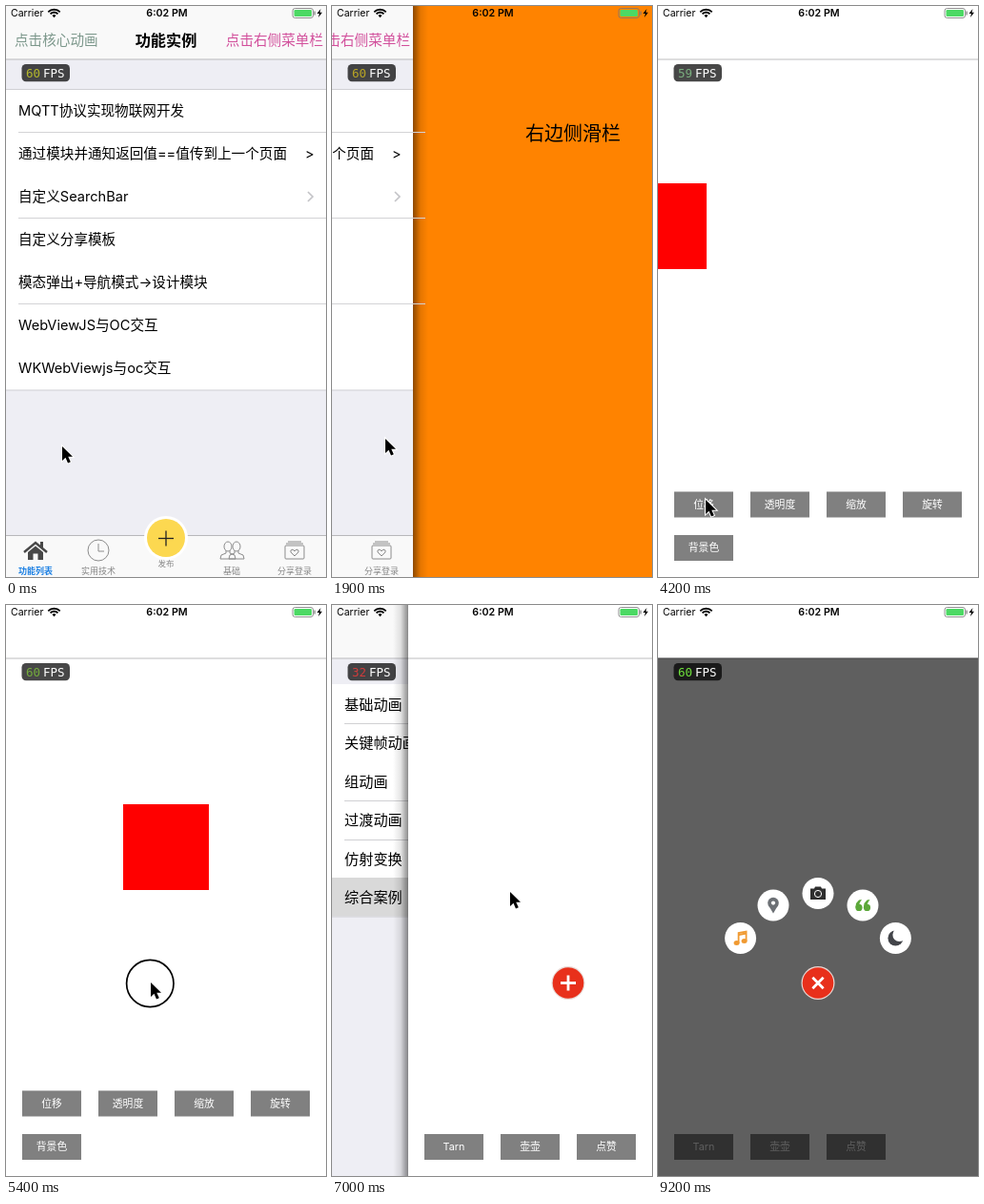
Recreate the animation shown at these times as an HTML page. Size 336 px wide and 599 px high, loop 9.3 s.

```html
<!DOCTYPE html>
<html lang="zh">
<head>
<meta charset="utf-8">
<style>
html, body { margin: 0; width: 100%; height: 100%; overflow: hidden; background: #fff; }
svg { display: block; width: 336px; height: 599px; }
text { font-family: Inter, "Noto Sans CJK SC", "Noto Sans CJK", sans-serif; white-space: pre; }
.mono { font-family: "DejaVu Sans Mono", monospace; }
</style>
</head>
<body>
<svg viewBox="0 0 336 599">
  <defs>
    <linearGradient id="shade">
      <stop offset="0" stop-opacity="0"/>
      <stop offset=".5" stop-opacity=".1"/>
      <stop offset="1" stop-opacity=".45"/>
    </linearGradient>
  </defs>
  <g id="scene"></g>
</svg>
<script>
const W = 336, H = 599, LOOP = 9300, STEP = 100;
const scene = document.getElementById('scene');

const HOME_ROWS = ['MQTT协议实现物联网开发', '通过模块并通知返回值==值传到上一个页面', '自定义SearchBar',
  '自定义分享模板', '模态弹出+导航模式-&gt;设计模块', 'WebViewJS与OC交互', 'WKWebViewjs与oc交互'];
const MENU_ROWS = ['基础动画', '关键帧动画', '组动画', '过渡动画', '仿射变换', '综合案例'];

// Keyframes: [time, value, ...]
const HOME_X = [[0, 0], [600, 255], [800, 287], [900, 287], [1300, 0], [1450, 0], [1800, -251],
  [2100, -251], [2500, 0], [2650, 0], [3000, 287]];
const BASIC_X = [[3400, W], [3600, 80], [3800, 0], [5400, 0], [5900, 250], [6100, W]];
const CASE_X = [[6800, W], [7000, 80], [7100, 24], [7200, 0]];
const CURSOR = [[0, 59, 462], [600, 270, 455], [900, 270, 455], [1250, 56, 458], [1400, 270, 456], [1750, 56, 454],
  [2100, 56, 454], [2450, 260, 450], [2600, 60, 445], [2900, 270, 430], [3200, 132, 105], [3700, 132, 105],
  [4100, 50, 518], [4900, 50, 518], [5200, 152, 396], [5400, 152, 396], [5900, 310, 390],
  [6600, 187, 301], [7400, 187, 301], [8200, 168, 398]];
const PRESSES = [[100, 600], [900, 1250], [1400, 1700], [2100, 2450], [2600, 2900], [5400, 5900], [8300, 8400]];
const FPS = [[0, 60, '#b5b82c'], [1500, 60, '#b9a524'], [2500, 60, '#74b054'],
  [3900, 59, '#7aae7e'], [5100, 60, '#74ac3c'], [6800, 32, '#d03c3c'], [7400, 60, '#6fe23c']];

function track(keys, t, i = 1) {
  const k = keys.findIndex(key => t <= key[0]);
  if (k === 0) return keys[0][i];
  if (k < 0) return keys[keys.length - 1][i];
  const a = keys[k - 1], b = keys[k];
  return a[i] + (b[i] - a[i]) * (t - a[0]) / (b[0] - a[0]);
}

const group = (x, y, body, extra = '') => `<g transform="translate(${x} ${y}) ${extra}">${body}</g>`;
const rect = (x, y, w, h, fill, r = 0, extra = '') =>
  `<rect x="${x}" y="${y}" width="${w}" height="${h}" rx="${r}" fill="${fill}" ${extra}/>`;
const ring = (color, width = 1) => `stroke="${color}" stroke-width="${width}"`;
const disc = (x, y, r, fill, extra = '') => `<circle cx="${x}" cy="${y}" r="${r}" fill="${fill}" ${extra}/>`;
const oval = (x, y, rx, ry, fill, extra = '') =>
  `<ellipse cx="${x}" cy="${y}" rx="${rx}" ry="${ry}" fill="${fill}" ${extra}/>`;
const poly = (points, fill, extra = '') => `<polygon points="${points}" fill="${fill}" ${extra}/>`;
const line = (points, color, width = 1) => `<polyline points="${points}" fill="none" ${ring(color, width)}/>`;
const plus = (r, color, width) => line([-r, 0, r, 0], color, width) + line([0, -r, 0, r], color, width);

function text(s, x, cy, size, color = '#000', anchor = 'start', weight = 400, cls = '') {
  return `<text x="${x}" y="${cy + size * 0.37}" font-size="${size}" fill="${color}" ` +
    `text-anchor="${anchor}" font-weight="${weight}" class="${cls}">${s}</text>`;
}

function arc(cx, cy, r, from, to, color, width) {
  const points = [];
  for (let i = 0; i <= 12; i++) {
    const a = (from + (to - from) * i / 12) * Math.PI / 180;
    points.push(cx + r * Math.cos(a), cy + r * Math.sin(a));
  }
  return line(points, color, width);
}

function panel(x, body) {
  const shade = rect(-16, 0, 16, H, 'url(#shade)');
  const shadows = x ? shade + group(W, 0, shade, 'scale(-1 1)') : '';
  return group(x, 0, shadows + rect(0, 0, W, H, '#fff') + body);
}

const navBar = (color = '#f9f9f9') => rect(0, 0, W, 55.5, color) + rect(0, 55.5, W, 1, '#bdbdc0');
const rules = (ys, x, color) => ys.map(y => rect(x, y, W, 1, color)).join('');

function tabIcons() {
  const gray = '#8c8c8c', dark = '#484848', edge = ring(gray);
  const house = line('-12,2 0,-8 12,2', dark, 2.4) + rect(5, -9, 3, 6, dark) +
    poly('-8,2 0,-4.5 8,2 8,10 2.5,10 2.5,3.5 -2.5,3.5 -2.5,10 -8,10', dark);
  const clock = disc(0, 0, 11, 'none', edge) + line('0,-7 0,1 6,1', gray);
  const person = oval(0, -4, 4, 5, '#f9f9f9', edge) + line('-2,0 -2,3 -7,5 -8,9 8,9 7,5 2,3 2,0', gray);
  const box = rect(-10, -5, 20, 14, 'none', 1, edge) + line('-9,-7 9,-7', gray) + line('-7,-9 7,-9', gray) +
    line('0,6 -4,2 -4,0 -2,-1 0,1 2,-1 4,0 4,2 0,6', gray);
  return group(31, 571, house) + group(97, 571, clock) + group(242, 571, person) +
    group(233, 571, person) + group(303, 571, box);
}

function home() {
  const tabs = [['功能列表', 31], ['实用技术', 97], ['基础', 237], ['分享登录', 303]];
  return rect(0, 0, W, H, '#eeeef4') + navBar() +
    text('点击核心动画', 9, 36, 14.6, '#7d988c') +
    text('功能实例', 168, 36, 16.2, '#000', 'middle', 600) +
    text('点击右侧菜单栏', 333, 36, 14.6, '#d2509c', 'end') +
    rect(0, 87, W, 316, '#fff') +
    HOME_ROWS.map((s, i) => text(s, 13, 110 + i * 45, 14.6)).join('') +
    rules([132, 222, 312], 13, '#d3d3d6') + rules([87, 402.5], 0, '#d0d0d4') +
    text('&gt;', 314, 155, 14.6) + line('317,195 322,200 317,205', '#c4c4c8', 1.7) +
    rect(0, 555, W, 44, '#f9f9f9') + rect(0, 555, W, 1, '#b8b8bb') + tabIcons() +
    disc(168, 558, 23, '#fff') + disc(168, 558, 20, '#fcd850') + group(168, 558.5, plus(8, '#222', 1.3)) +
    text('发布', 168, 585, 8.5, '#888', 'middle') +
    tabs.map(([s, x], i) => text(s, x, 593, 9, i ? '#888' : '#1b7fe3', 'middle', i ? 400 : 600)).join('');
}

function leftMenu(selected, titled) {
  return rect(0, 0, W, H, '#eeeef4') + navBar() +
    (titled ? text('核心动画', 143, 36, 16.2, '#000', 'middle', 600) : '') +
    rect(0, 83, W, 244, '#fff') +
    (selected >= 0 ? rect(0, 83 + selected * 40.6, W, 40.6, '#d9d9d9') : '') +
    MENU_ROWS.map((s, i) => text(s, 13, 104 + i * 40.5, 15.2)).join('') +
    rules(selected ? [124, 205, 246] : [205, 246], 13, '#d0d0d3') + rules([326.5], 0, '#d0d0d4');
}

const rightMenu = () => rect(0, 0, W, H, '#ff8300') + text('右边侧滑栏', 253, 134, 20, '#000', 'middle');

function buttons(labels, top) {
  return labels.map((s, i) => {
    const x = 17 + i % 4 * 80, y = top + Math.floor(i / 4) * 45.5;
    return rect(x, y, 62, 27, '#808080') + text(s, x + 31, y + 13.5, 10.8, '#fff', 'middle');
  }).join('');
}

function basicPage(t) {
  const moving = t >= 4180 && t < 5050;
  const cx = moving ? (t - 4182) / 1000 * W : 168;
  return navBar('#fff') + rect(cx - 45, moving ? 186 : 209, 90, 90, '#f00') +
    buttons(['位移', '透明度', '缩放', '旋转', '背景色'], 509.5);
}

function itemIcons() {
  const orange = '#f09a32', dark = '#2e2e2e', green = '#5ca83a';
  const quote = disc(0, 2.3, 3.6, green) + poly('-3.6,2.5 -3,-2 0,-5.5 3,-6 1,-3 0,0', green);
  return [
    oval(-4, 5, 3, 2.5, orange) + oval(4, 3, 3, 2.5, orange) +
      line('-2,5 -2,-5.5 6,-7 6,3', orange, 1.8) + line('-2,-3.5 6,-5', orange, 2),
    disc(0, -2.5, 5.8, '#6c7075') + poly('-5.3,-.5 5.3,-.5 0,8.5', '#6c7075') + disc(0, -2.5, 2.1, '#fff'),
    poly('-8,-5 -4,-5 -3,-7 3,-7 4,-5 8,-5 8,6.5 -8,6.5', dark) + disc(0, 0.5, 3.6, dark, ring('#fff')),
    group(-4, 0, quote) + group(4.5, 0, quote),
    disc(0, 0, 8, '#43454a') + disc(4, -3.5, 7, '#fff')
  ];
}

function casePage(t) {
  const open = track([[8400, 0], [8700, 1]], t);
  const spread = track([[8400, 0], [8600, 0.75], [8700, 1.08], [8800, 1]], t);
  const items = open ? itemIcons().map((icon, i) => {
    const a = (150 - 30 * i) * Math.PI / 180;
    const x = 168 + 94 * spread * Math.cos(a), y = 396.5 - 94 * spread * Math.sin(a);
    return group(x, y, disc(0, 0, 16.5, '#fff') + icon);
  }).join('') : '';
  return navBar('#fff') + buttons(['Tarn', '壶壶', '点赞'], 555) +
    rect(0, 55.5, W, H, '#000', 0, `opacity="${0.627 * open}"`) + items +
    disc(168, 396.5, 17.5, '#e8d8d4') + disc(168, 396.5, 16.3, '#e8301b') +
    group(168, 396.5, plus(8, '#fff', 2.8), `rotate(${45 * open})`);
}

function statusBar() {
  return text('Carrier', 5, 7.5, 10.5) + text('6:02 PM', 169, 7.5, 10.7, '#000', 'middle', 600) +
    arc(50.5, 12, 8.3, -138, -42, '#000', 1.8) + arc(50.5, 12, 5.3, -138, -42, '#000', 1.8) +
    poly('48.4,9.8 50.5,9 52.6,9.8 50.5,12.2', '#000') +
    rect(301, 2.5, 21.5, 10, 'none', 2.5, ring('#777', 0.8)) + rect(302.5, 4, 18.5, 7, '#4cd964', 1.3) +
    rect(323.5, 5.5, 1.2, 4, '#777') + poly('330.5,3 326.5,8 329,8 328,12 332,6.8 329.5,6.8', '#000');
}

function fpsLabel(t) {
  const [, value, color] = FPS.filter(f => f[0] <= t).pop();
  return rect(16.5, 61, 50.5, 18.3, 'rgba(0,0,0,.72)', 4.5) +
    text(value, 21, 70.5, 12.5, color, 'start', 400, 'mono') +
    text('FPS', 39, 70.5, 12.5, '#fff', 'start', 400, 'mono');
}

function cursor(t) {
  if (t >= 8800) return '';
  const pressed = PRESSES.some(([from, to]) => t >= from && t < to);
  const arrow = poly('0,0 0,15 3.5,11.8 6,17.5 8.8,16.3 6.3,10.8 11,10.8', '#000',
    ring('#fff', 2) + ' paint-order="stroke"');
  return group(track(CURSOR, t), track(CURSOR, t, 2),
    (pressed ? disc(-0.7, 1, 24.7, 'none', ring('#000', 1.7)) : '') + arrow);
}

function render(t) {
  const homeX = track(HOME_X, t), basicX = track(BASIC_X, t), caseX = track(CASE_X, t);
  const selected = t >= 6700 ? 5 : t >= 3250 && t < 5900 ? 0 : -1;
  scene.innerHTML = (homeX < 0 ? rightMenu() : leftMenu(selected, t < 6800)) +
    panel(homeX, home()) +
    (basicX < W ? panel(basicX, basicPage(t)) : '') +
    (caseX < W ? panel(caseX, casePage(t)) : '') +
    statusBar() + fpsLabel(t) + cursor(t);
}

const start = performance.now();
let shown = -1;
function tick() {
  const t = Math.floor((performance.now() - start) % LOOP / STEP) * STEP;
  if (t !== shown) render(shown = t);
  requestAnimationFrame(tick);
}
tick();
</script>
</body>
</html>
```
